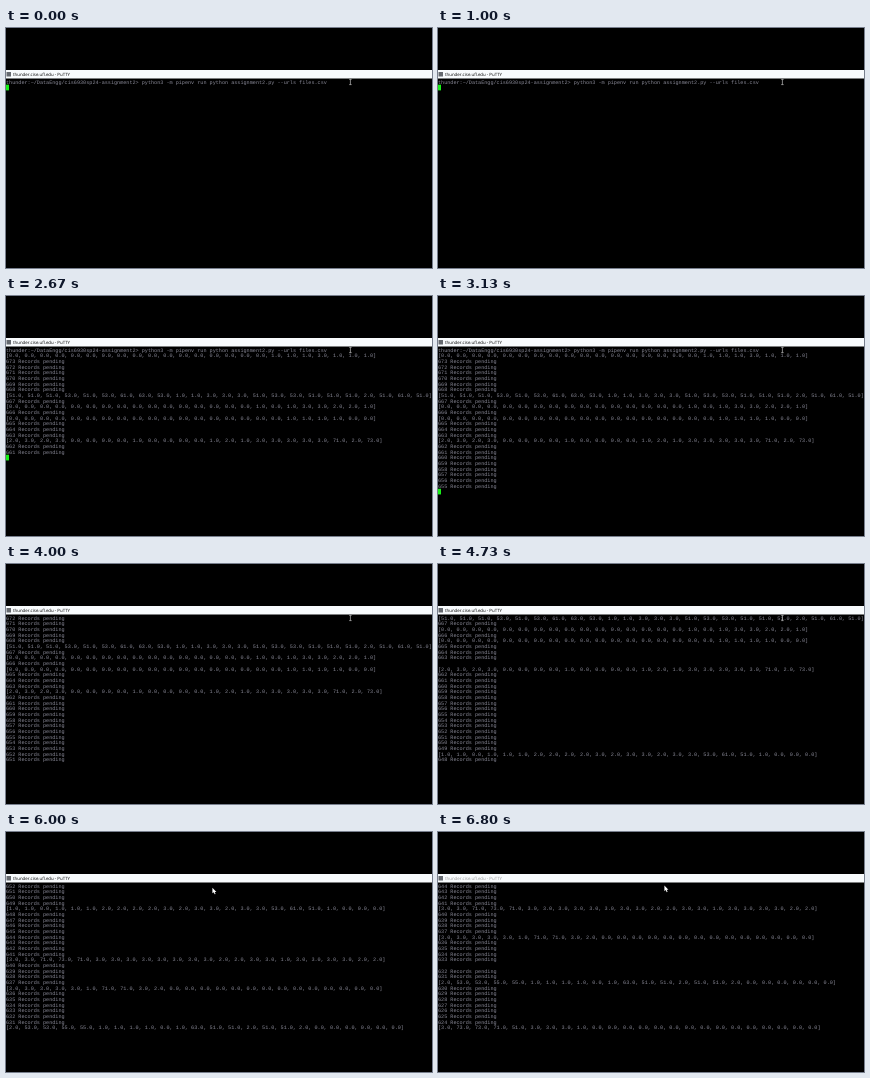
Animation, 426 px wide and 240 px high, one loop 6.87 s. Source, as an HTML page:

```html
<!DOCTYPE html>
<html lang="en">
<head>
<meta charset="utf-8">
<title>Terminal session</title>
<style>
  html, body { margin: 0; width: 100%; height: 100%; overflow: hidden; background: #000; }
  svg { display: block; width: 100vw; height: 100vh; }
  text { white-space: pre; text-rendering: geometricPrecision; }
  #rows { font: 5.15px "Liberation Mono", monospace; fill: #8a8a98; }
  #title { font: 4.37px "Open Sans", sans-serif; }
</style>
</head>
<body>
<svg viewBox="0 0 426 240">
  <rect width="426" height="240"/>
  <rect y="42" width="426" height="8.5" fill="#f8fbfd"/>
  <rect x="0.5" y="44" width="4.5" height="4.5" fill="#666a70"/>
  <text id="title" x="7" y="48">thunder.cise.ufl.edu - PuTTY</text>
  <g id="rows"></g>
  <rect id="caret" width="3" height="5.7" fill="#18f018"/>
  <path id="beam" d="M343.2 51.4h2.4M344.4 51.4v5.2M343.2 56.6h2.4" fill="none" stroke="#c0c0c0" stroke-width=".7"/>
  <path id="arrow" d="M0 0V5.6L1.3 4.5L2.3 6.6L3.2 6.2L2.3 4.2H4Z" fill="#fff"/>
</svg>
<script>
const LOOP = 6870, ROWS = 26, TOP = 51, PITCH = 5.67;
const $ = id => document.getElementById(id);

// Each block: hourly codes ("code*repeat"), then how many countdown lines follow.
const BLOCKS = [
  ["0*17 1*3 3 1*3", 6],
  ["51*3 53 51 53 61 63 53 1 1 3*3 51 53 53 51*3 2 51 61 51", 1],
  ["0*16 1 0 1 3 3 2 2 1", 1],
  ["0*18 1*4 0 0", 3],
  ["2 3 2 3 0*4 1 0*4 1 2 1 3*5 71 2 73", 14],
  ["1 1 0 1*3 2*4 3 2 3 3 2 3 3 53 61 51 1 0*3", 8],
  ["3 3 71 73 71 3*8 2 2 3 3 1 3*4 2 2", 4],
  ["3*5 1 71 71 3 2 0*14", 6],
  ["2 53 53 55 55 1*4 0 1 63 51 51 2 51 51 2 0*6", 7],
  ["3 73 73 71 51 3*3 1 0*15", 0]
];

function formatList(codes) {
  const values = codes.split(" ").flatMap(run => {
    const [code, repeat = 1] = run.split("*");
    return Array(+repeat).fill(code + ".0");
  });
  return `[${values.join(", ")}]`;
}

const log = ["thunder:~/DataEngg/cis6930sp24-assignment2> python3 -m pipenv run python assignment2.py --urls files.csv"];
let pending = 673;
for (const [codes, count] of BLOCKS) {
  log.push(formatList(codes));
  for (let i = 0; i < count; i++) log.push(`${pending--} Records pending`);
}

// [tick, value] keys, 15 ticks per second
const PRINTED = [[0, 1], [17, 1], [22, 3], [24, 3], [32, 10], [33, 12], [44, 23], [47, 25], [71, 33], [90, 53], [102, 61]];
const MOUSE_X = [[76, 344], [86, 206.4], [91, 206.4], [98, 226.4]];
const MOUSE_Y = [[76, 54], [86, 55.7], [91, 55.7], [98, 53.6]];
// Half-finished scrolls: tick -> row left blank
const TEARS = { 71: 8, 102: 14 };

const linear = p => p;
const smooth = p => p * p * (3 - 2 * p);

function sample(keys, tick, ease = linear) {
  const next = keys.findIndex(([at]) => at > tick);
  if (next === 0) return keys[0][1];
  if (next < 0) return keys[keys.length - 1][1];
  const [t0, v0] = keys[next - 1], [t1, v1] = keys[next];
  return v0 + (v1 - v0) * ease((tick - t0) / (t1 - t0));
}

const rows = Array.from({ length: ROWS }, (_, i) => {
  const row = document.createElementNS("http://www.w3.org/2000/svg", "text");
  row.setAttribute("x", 0);
  row.setAttribute("y", TOP + PITCH * i + 4.7);
  return $("rows").appendChild(row);
});

const show = (node, visible) => node.setAttribute("visibility", visible ? "visible" : "hidden");

function render(ms) {
  const tick = Math.floor(ms * 0.015 + 0.06);
  const printed = Math.floor(sample(PRINTED, tick) + 0.01);
  const first = Math.max(0, printed - ROWS);
  const tear = TEARS[tick] ?? -1;

  rows.forEach((row, i) => {
    const index = first + i + (i < tear ? 1 : 0);
    const text = i !== tear && index < printed ? log[index] : "";
    if (row.textContent !== text) row.textContent = text;
  });

  show($("caret"), printed < ROWS);
  $("caret").setAttribute("y", TOP + PITCH * printed);

  const moving = tick > 76;
  show($("beam"), !moving);
  show($("arrow"), moving);
  $("arrow").setAttribute("transform",
    `translate(${sample(MOUSE_X, tick, smooth)} ${sample(MOUSE_Y, tick, smooth)})`);
  $("title").setAttribute("fill", tick >= 98 ? "#999" : "#000");
}

const start = performance.now();
function loop() {
  render((performance.now() - start) % LOOP);
  requestAnimationFrame(loop);
}
loop();
</script>
</body>
</html>
```
